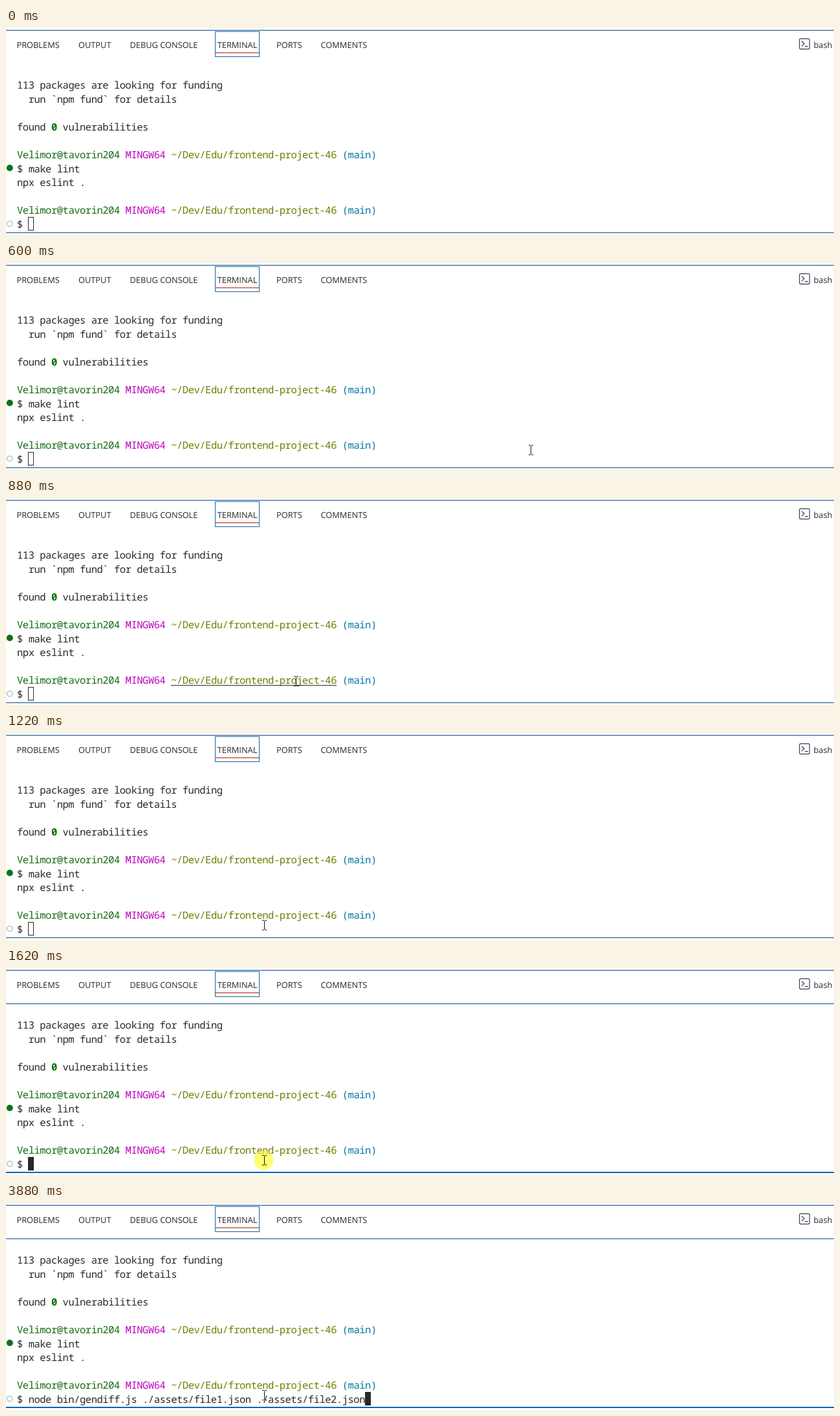
Recreate the animation shown at these times as an HTML page. Size 1280x321 px, loop 8000 ms.

```html
<!DOCTYPE html>
<html lang="en">
<head>
<meta charset="utf-8">
<title>Terminal</title>
<style>
  html, body { margin: 0; width: 100%; height: 100%; overflow: hidden; background: #fff; }
  svg { display: block; width: 100vw; height: 100vh; }
  text {
    font: 15.5px "Noto Sans Mono", monospace;
    letter-spacing: -.48px;
    white-space: pre;
    text-rendering: geometricPrecision;
    fill: #292929;
  }
  .tab { font: 12.8px "Open Sans", "Noto Sans", sans-serif; letter-spacing: 0; }
  .user { fill: #136c13; }
  .sys { fill: #bc05bc; }
  .path { fill: #767a00; }
  .branch { fill: #0475a3; }
  .zero { fill: #007100; font-weight: 700; }
  .line { fill: #0f4a85; }

  .anim { animation: 8s step-end infinite; }
  #mouse { animation-name: mouse; }
  #link { animation-name: link; }
  #click { animation-name: click; }
  .blur { animation-name: blur; }
  .focus { animation-name: focus; }
  #block { animation-name: block; }
  #command { animation-name: command; }

  @keyframes mouse {
    0%      { transform: translate(1185px, 340px); }
    4.875%  { transform: translate(1185px, 315px); }
    5.75%   { transform: translate(1078px, 304px); }
    6.625%  { transform: translate(942px, 296px); }
    7.5%    { transform: translate(811px, 290px); }
    8.375%  { transform: translate(690px, 284px); }
    9.25%   { transform: translate(588px, 280px); }
    10.125% { transform: translate(506px, 281px); }
    11%     { transform: translate(448px, 284px); }
    11.875% { transform: translate(415px, 291px); }
    12.75%  { transform: translate(401px, 297px); }
    15.25%, 100% { transform: translate(399px, 298px); }
  }
  @keyframes link {
    0%, 12.75%, 100% { visibility: hidden; }
    10.125% { visibility: visible; }
  }
  @keyframes click {
    0%, 21.875%, 100% { visibility: hidden; }
    19.375% { visibility: visible; }
  }
  @keyframes blur {
    0% { visibility: visible; }
    20.25%, 100% { visibility: hidden; }
  }
  @keyframes focus {
    0% { visibility: hidden; }
    20.25%, 100% { visibility: visible; }
  }
  @keyframes block {
    0% { transform: none; }
    48.5%, 100% { transform: translateX(521px); }
  }
  @keyframes command {
    0% { visibility: hidden; }
    48.5%, 100% { visibility: visible; }
  }
</style>
</head>
<body>
<svg viewBox="0 0 1280 321" preserveAspectRatio="none">
  <defs>
    <text id="prompt" x="17"><tspan class="user">Velimor@tavorin204</tspan> <tspan class="sys">MINGW64</tspan> <tspan class="path">~/Dev/Edu/frontend-project-46</tspan> <tspan class="branch">(main)</tspan></text>
  </defs>

  <rect class="line" y="3" width="1280" height="1"/>
  <rect class="line anim focus" y="55" width="1280" height="1"/>
  <rect class="line anim blur" y="317" width="1280" height="1"/>
  <rect class="anim focus" y="316" width="1280" height="2" fill="#0064b5"/>

  <g>
    <text class="tab" x="16.5" y="30.5">PROBLEMS</text>
    <text class="tab" x="112" y="30.5">OUTPUT</text>
    <text class="tab" x="191.5" y="30.5">DEBUG CONSOLE</text>
    <text class="tab" x="357.5" y="30.5" text-anchor="middle">TERMINAL</text>
    <text class="tab" x="418" y="30.5">PORTS</text>
    <text class="tab" x="486.5" y="30.5">COMMENTS</text>
    <text class="tab" x="1248.5" y="30.5">bash</text>
    <rect x="323.5" y="5.5" width="68" height="39" fill="none" stroke="#0f67ab"/>
    <rect x="324" y="38" width="67" height="1" fill="#b5200d"/>
    <g fill="none" stroke="#39415a" stroke-width="1.2">
      <rect x="1226.6" y="16.6" width="15.6" height="16" rx="2"/>
      <path d="M1230 20.5l4 3.8-4 3.8M1235 28.6h5"/>
    </g>
  </g>

  <g>
    <text x="17" y="94">113 packages are looking for funding</text>
    <text x="34.64" y="115.5">run `npm fund` for details</text>
    <text x="17" y="158.5">found <tspan class="zero">0</tspan> vulnerabilities</text>
    <use href="#prompt" y="202"/>
    <text x="17" y="223.5">$ make lint</text>
    <text x="17" y="245">npx eslint .</text>
    <use href="#prompt" y="288"/>
    <text x="17" y="309.5">$ </text>
    <text id="command" class="anim" x="34.64" y="309.5">node bin/gendiff.js ./assets/file1.json ./assets/file2.json</text>
    <circle cx="5.8" cy="217" r="5" fill="#10701a"/>
    <circle cx="5.8" cy="303.5" r="4.2" fill="none" stroke="#a3c0bd" stroke-width="1.2"/>
    <rect id="link" class="anim" x="255" y="290" width="256" height="1" fill="#292929"/>
    <rect class="anim blur" x="34.5" y="293.5" width="8" height="20" fill="none" stroke="#292929"/>
    <g id="block" class="anim">
      <rect class="anim focus" x="34" y="293" width="9" height="21" fill="#292929"/>
    </g>
  </g>

  <circle id="click" class="anim" cx="398.5" cy="298" r="15" fill="#ff0" fill-opacity=".55"/>
  <g id="mouse" class="anim">
    <path d="M-3 -7.5h2.5l1 1 1-1H4M.5 -6.5v13M-3 7.5h2.5l1-1 1 1H4" fill="none" stroke="#111"/>
  </g>
</svg>
</body>
</html>
```
